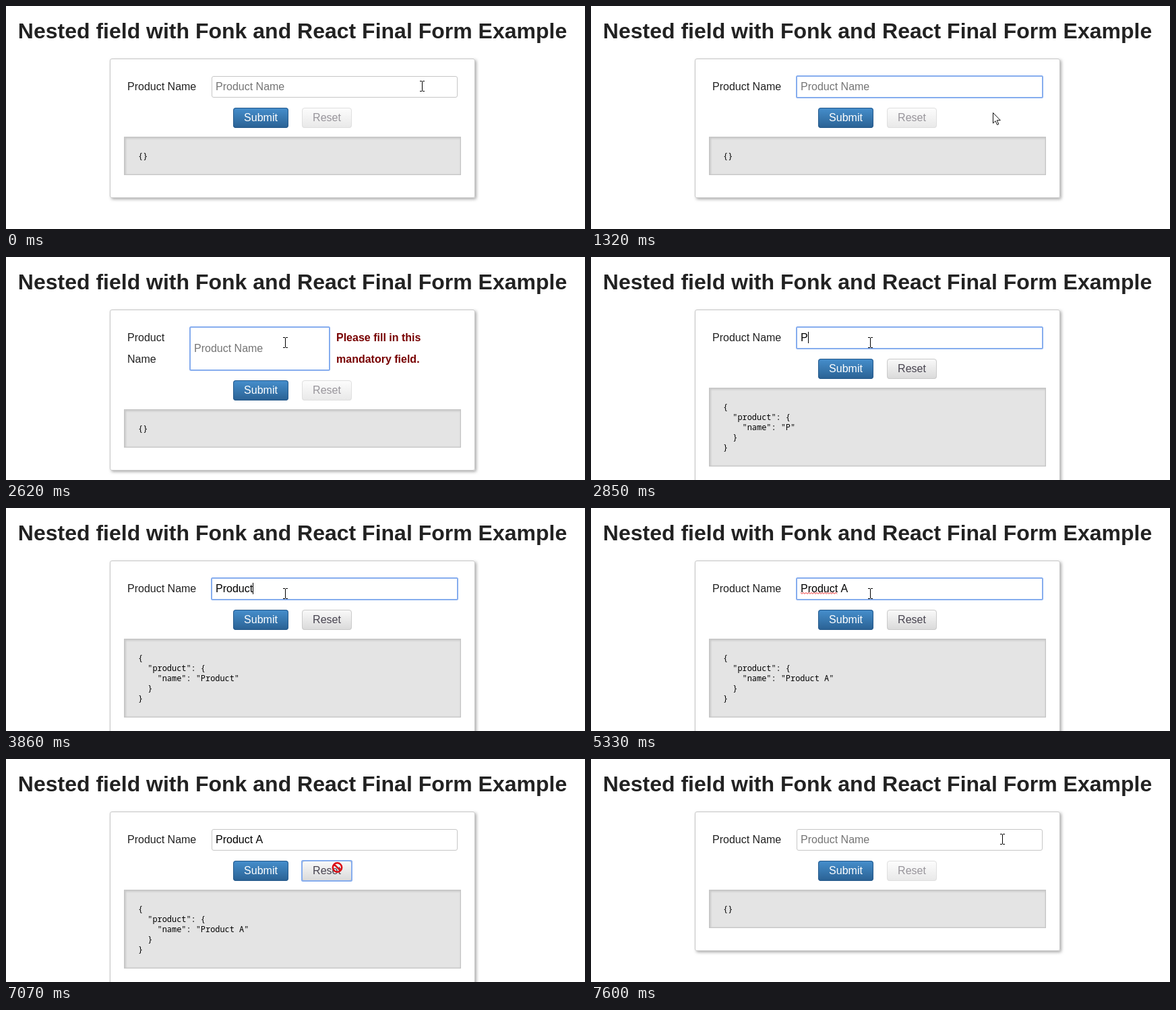
Write an HTML page with a canvas that moves like this. It is 859 px wide and 331 px high and loops after 7.83 s.

```html
<!DOCTYPE html>
<html lang="en">
<head>
<meta charset="utf-8">
<title>Nested field form</title>
<style>
  html, body { margin: 0; width: 100%; height: 100%; overflow: hidden; background: #fff; }
  canvas { display: block; }
</style>
</head>
<body>
<canvas id="stage" width="859" height="331"></canvas>
<script>
const ctx = document.getElementById('stage').getContext('2d');
const LOOP = 7830;
const SANS = '"Liberation Sans", Arial, sans-serif';
const MONO = '11.92px "Noto Sans Mono", monospace';
const FULL = 'Product A';

const INVALID = 1460, CLEARED = 7140, BLURRED = 7070;
const KEYS = [2850, 3080, 3160, 3320, 3470, 3620, 3860, 4020, 4870];
const BLINKS = [760, 1290, 2070, 2620, 2850, 4550, 4870, 5330, 5890, 6440, 6990, 7070];

// time, shape, x, y: each pose holds until the next
const POINTER = [
  [0, 'beam', 617, 119],
  [910, 'beam', 616, 122],
  [990, 'beam', 613, 128],
  [1070, 'arrow', 608, 138],
  [1150, 'arrow', 601, 150],
  [1230, 'arrow', 596, 158],
  [1540, 'arrow', 568, 161],
  [1610, 'beam', 518, 165],
  [1690, 'beam', 467, 165],
  [1770, 'beam', 426, 138],
  [1840, 'beam', 414, 127],
  [5500, 'beam', 424, 131],
  [5580, 'arrow', 447, 142],
  [5660, 'arrow', 475, 154],
  [5740, 'arrow', 491, 161],
  [7070, 'blocked', 491, 161],
  [7220, 'arrow', 508, 153],
  [7300, 'arrow', 533, 141],
  [7370, 'beam', 561, 129],
  [7450, 'beam', 585, 122],
  [7530, 'beam', 603, 119],
  [7600, 'beam', 610, 119]
];

const between = (t, a, b) => t >= a && t < b;
const passed = (t, times) => times.filter(s => t >= s).length;

function text(str, x, y, color, font = '16px ' + SANS, align = 'left') {
  ctx.font = font;
  ctx.textAlign = align;
  ctx.fillStyle = color;
  ctx.fillText(str, x, y);
}

function roundPath(x, y, w, h, r) {
  ctx.beginPath();
  ctx.roundRect(x, y, w, h, r);
}

function outline(x, y, w, h, r, color, width = 1) {
  roundPath(x + width / 2, y + width / 2, w - width, h - width, r);
  ctx.lineWidth = width;
  ctx.strokeStyle = color;
  ctx.stroke();
}

function shadow(color, blur, offset) {
  ctx.shadowColor = color;
  ctx.shadowBlur = blur;
  ctx.shadowOffsetX = ctx.shadowOffsetY = offset;
}

function panel(h) {
  ctx.save();
  shadow('rgba(0,0,0,.32)', 4, 2);
  ctx.fillStyle = '#fff';
  roundPath(154, 78, 542, h, 3);
  ctx.fill();
  ctx.restore();
  outline(154, 78, 542, h, 2.5, '#c8c8c8');
}

function button(label, x, y, w, colors, border, ink) {
  const fill = ctx.createLinearGradient(0, y, 0, y + 30);
  fill.addColorStop(0, colors[0]);
  fill.addColorStop(1, colors[1]);
  ctx.fillStyle = fill;
  roundPath(x, y, w, 30, 4);
  ctx.fill();
  outline(x, y, w, 30, 3.5, border);
  text(label, x + w / 2, y + 20, ink, undefined, 'center');
}

function codeBox(y, lines) {
  const h = 57 + (lines.length - 1) * 15;
  ctx.save();
  ctx.beginPath();
  ctx.rect(175, y, 500, h);
  ctx.clip();
  ctx.fillStyle = '#e4e4e4';
  ctx.fillRect(175, y, 500, h);
  shadow('rgba(0,0,0,.35)', 3, 1);
  ctx.strokeStyle = '#c4c4c4';
  ctx.lineWidth = 1;
  ctx.strokeRect(175.5, y + .5, 499, h - 1);
  ctx.restore();
  lines.forEach((line, i) => text(line, 196, y + 33 + i * 15, '#000', MONO));
}

function squiggle(x0, x1, y) {
  ctx.beginPath();
  for (let x = x0; x <= x1; x += 2) ctx.lineTo(x, y + ((x - x0) / 2 % 2 ? 1 : -1));
  ctx.strokeStyle = '#f02020';
  ctx.lineWidth = 1;
  ctx.stroke();
}

function field(t, invalid, value) {
  const x = invalid ? 273 : 305, w = invalid ? 207 : 365, h = invalid ? 64 : 32;
  const base = invalid ? 141 : 125;
  const focused = between(t, 760, INVALID) || between(t, 2070, BLURRED);
  ctx.fillStyle = '#fff';
  ctx.fillRect(x, 104, w, h);
  if (focused) outline(x - 1, 103, w + 2, h + 2, 1.5, '#86adee', 2);
  else outline(x, 104, w, h, 2.5, '#c6c6c6');

  text(value || 'Product Name', x + 6, base, value ? '#000' : '#757575');
  if (focused && value.length > 7) squiggle(x + 6, x + 61, 126.5);
  if (focused && passed(t, BLINKS) % 2) {
    const caret = Math.round(x + 6 + (value ? ctx.measureText(value).width : 0));
    ctx.fillStyle = '#000';
    ctx.fillRect(caret, base - 14, 1, 17);
  }
}

const CURSORS = {
  beam() {
    ctx.fillStyle = '#000';
    ctx.fillRect(0, -7, 1, 14);
    for (const y of [-8, 7]) {
      ctx.fillRect(-3, y, 3, 1);
      ctx.fillRect(1, y, 3, 1);
    }
  },
  arrow() {
    ctx.beginPath();
    [[.5, .5], [.5, 16], [4, 12.6], [6.6, 18.3], [8.8, 17.3], [6.3, 11.7], [11.3, 11.7]]
      .forEach(p => ctx.lineTo(...p));
    ctx.closePath();
    ctx.fillStyle = '#fff';
    ctx.fill();
    ctx.strokeStyle = '#111';
    ctx.lineWidth = 1;
    ctx.stroke();
  },
  blocked() {
    ctx.beginPath();
    ctx.arc(.5, 0, 6.7, 0, Math.PI * 2);
    ctx.moveTo(-4.2, -4.7);
    ctx.lineTo(5.2, 4.7);
    ctx.strokeStyle = '#dc0a14';
    ctx.lineWidth = 2.5;
    ctx.stroke();
  }
};

function pointer(t) {
  const [, shape, x, y] = POINTER[passed(t, POINTER.map(p => p[0])) - 1];
  ctx.save();
  ctx.translate(x, y);
  CURSORS[shape]();
  ctx.restore();
}

function draw(t) {
  const invalid = between(t, INVALID, KEYS[0]);
  const value = t < CLEARED ? FULL.slice(0, passed(t, KEYS)) : '';
  const drop = invalid ? 32 : 0;
  const lines = value
    ? ['{', '  "product": {', `    "name": "${value}"`, '  }', '}']
    : ['{}'];

  ctx.fillStyle = '#fff';
  ctx.fillRect(0, 0, 859, 331);
  ctx.fontKerning = 'none';
  text('Nested field with Fonk and React Final Form Example', 425, 48, '#222',
    'bold 32px ' + SANS, 'center');
  panel(207 + drop + (lines.length - 1) * 15);

  if (invalid) {
    text('Product', 180, 125, '#222');
    text('Name', 180, 157, '#222');
    text('Please fill in this', 490, 125, '#780000', 'bold 16px ' + SANS);
    text('mandatory field.', 490, 157, '#780000', 'bold 16px ' + SANS);
  } else {
    text('Product Name', 180, 125, '#222');
  }
  field(t, invalid, value);

  button('Submit', 337, 151 + drop, 82, ['#468fcd', '#2a6193'], '#24588a', '#fff');
  if (value) button('Reset', 439, 151, 74, ['#fafafa', '#d9d9d9'], '#cacaca', '#484450');
  else button('Reset', 439, 151 + drop, 74, ['#fdfdfd', '#e8e8e8'], '#dfdfdf', '#98959b');
  if (between(t, BLURRED, CLEARED)) outline(438, 150, 76, 32, 1.5, '#86adee', 2);

  codeBox(194 + drop, lines);
  pointer(t);
}

function tick() {
  draw(performance.now() % LOOP);
  requestAnimationFrame(tick);
}
tick();
</script>
</body>
</html>
```
